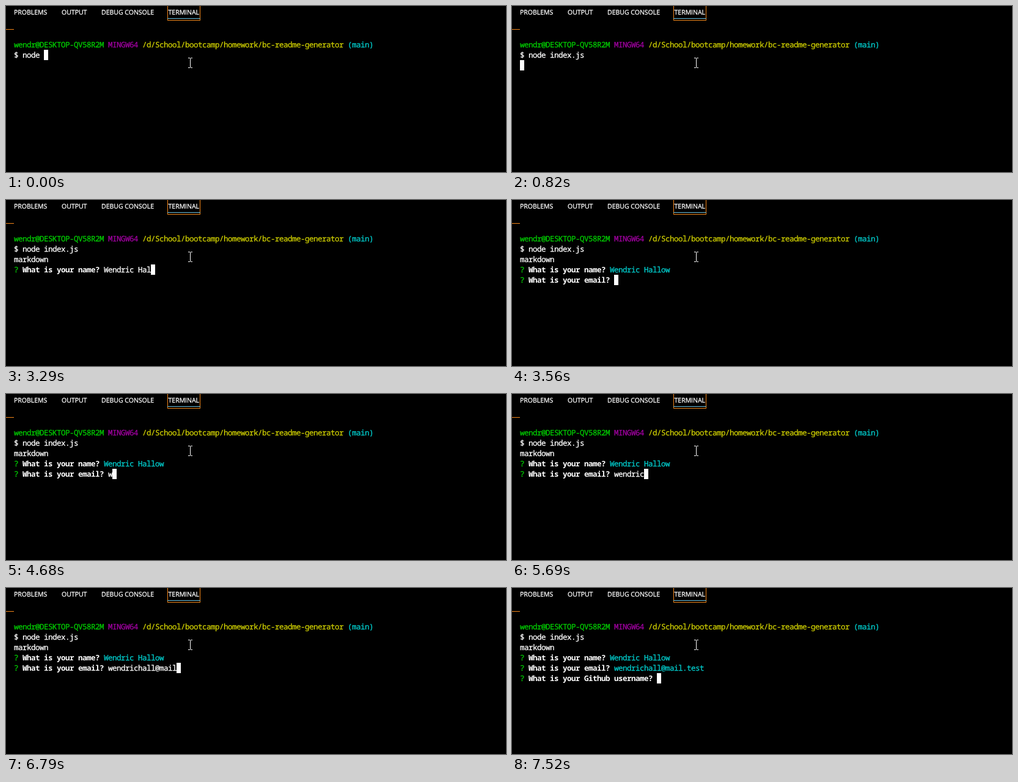
These frames come from a looping animation (818x273 px, 8 s). An HTML page:

```html
<!DOCTYPE html>
<html lang="en">
<head>
<meta charset="utf-8">
<title>Terminal session</title>
<style>
  html, body { margin: 0; width: 100%; height: 100%; overflow: hidden; background: #000; }
  svg { display: block; width: 818px; height: 273px; }
  text {
    white-space: pre; text-rendering: geometricPrecision;
    color: #fff; fill: currentColor; stroke: currentColor; stroke-width: .3px;
  }
  .tabs text { font: 10.5px "Open Sans", "Noto Sans", sans-serif; }
  .term text { font: 12.5px "Noto Sans Mono", "DejaVu Sans Mono", monospace; letter-spacing: -.5px; }
  .term .bold { font-weight: 700; stroke: none; }
  .term .green { color: #00cd00; }
  .term .purple { color: #a000a0; }
  .term .yellow { color: #cdcd00; }
  .term .cyan { color: #00cdcd; }
</style>
</head>
<body>
<svg viewBox="0 0 818 273">
  <rect width="818" height="273" fill="#000"/>
  <g class="tabs">
    <text x="13" y="14">PROBLEMS</text>
    <text x="91" y="14">OUTPUT</text>
    <text x="156" y="14">DEBUG CONSOLE</text>
    <text x="265.5" y="14">TERMINAL</text>
  </g>
  <g shape-rendering="crispEdges">
    <path d="M264.5 0V23.5H317.5V0" fill="none" stroke="#f38518"/>
    <rect x="264" y="20" width="54" height="1" fill="#6fc3df"/>
    <rect y="38" width="13" height="1" fill="#f38518"/>
  </g>
  <g class="term" id="term"></g>
  <rect id="cursor" width="7" height="17" fill="#fff" shape-rendering="crispEdges"/>
  <path d="M298 85.5H301M302 85.5H305M301.5 86V101M298 101.5H301M302 101.5H305"
        fill="none" stroke="#fff" shape-rendering="crispEdges"/>
</svg>
<script>
const LOOP = 8000, TICK = 90, CELL = 7, ROW = 17, LEFT = 13, TOP = 55, BASE = 13;
const term = document.getElementById('term');
const cursor = document.getElementById('cursor');

function addText(row, col, str, cls = '') {
  const el = document.createElementNS('http://www.w3.org/2000/svg', 'text');
  el.setAttribute('x', LEFT + col * CELL);
  el.setAttribute('y', TOP + row * ROW + BASE);
  el.setAttribute('class', cls);
  el.textContent = str;
  term.append(el);
  return el;
}

function addPrompt() {
  let col = 0;
  for (const [str, cls] of [
    ['wendr@DESKTOP-QV58R2M', 'green'],
    ['MINGW64', 'purple'],
    ['/d/School/bootcamp/homework/bc-readme-generator', 'yellow'],
    ['(main)', 'cyan']
  ]) {
    addText(0, col, str, cls);
    col += str.length + 1;
  }
}

// A burst types its text evenly over some ticks, by default one character each
const burst = (at, text, ticks = text.length) => ({ at, text, ticks });

function typed({ at, text, ticks }, t) {
  if (t < at) return '';
  const tick = Math.min(ticks, Math.floor((t - at) / TICK) + 1);
  return text.slice(0, Math.round(text.length * tick / ticks));
}

const fields = [
  { at: 0, col: 7, bursts: [burst(90, 'inde', 3), burst(450, 'x.js ', 1)] },
  { at: 820, col: 0, bursts: [] },
  { at: 1380, ask: 'What is your name?', bursts: [
    burst(2030, 'We', 3), burst(2390, 'ndric '), burst(3020, 'Ha'), burst(3290, 'llow', 3)
  ] },
  { at: 3560, ask: 'What is your email?', bursts: [
    burst(4680, 'we'), burst(5050, 'nd'), burst(5420, 'r'), burst(5600, 'ic'),
    burst(5870, 'hall'), burst(6330, '@'), burst(6610, 'mail.', 4), burst(7070, 'test')
  ] },
  { at: 7520, ask: 'What is your Github username?', bursts: [] }
];

addPrompt();
addText(1, 0, '$ node');
const output = addText(2, 0, 'markdown');

fields.forEach((f, i) => {
  f.row = i + 1;
  f.labels = [];
  if (f.ask) {
    f.col = f.ask.length + 3;
    f.labels = [addText(f.row, 0, '?', 'green'), addText(f.row, 2, f.ask, 'bold')];
  }
  f.input = addText(f.row, f.col, '');
});

const show = (el, on) => el.setAttribute('visibility', on ? 'visible' : 'hidden');

function render(t) {
  const active = fields.findLast(f => f.at <= t);
  for (const f of fields) {
    const str = f.bursts.map(b => typed(b, t)).join('');
    f.labels.forEach(el => show(el, f.at <= t));
    f.input.textContent = str;
    f.input.setAttribute('class', f.ask && f !== active ? 'cyan' : '');
    if (f === active) {
      cursor.setAttribute('x', LEFT + (f.col + str.length) * CELL);
      cursor.setAttribute('y', TOP + f.row * ROW);
    }
  }
  show(output, active.row > 2);
}

const start = performance.now();
function tick() {
  render(Math.max(0, performance.now() - start) % LOOP);
  requestAnimationFrame(tick);
}
tick();
</script>
</body>
</html>
```
